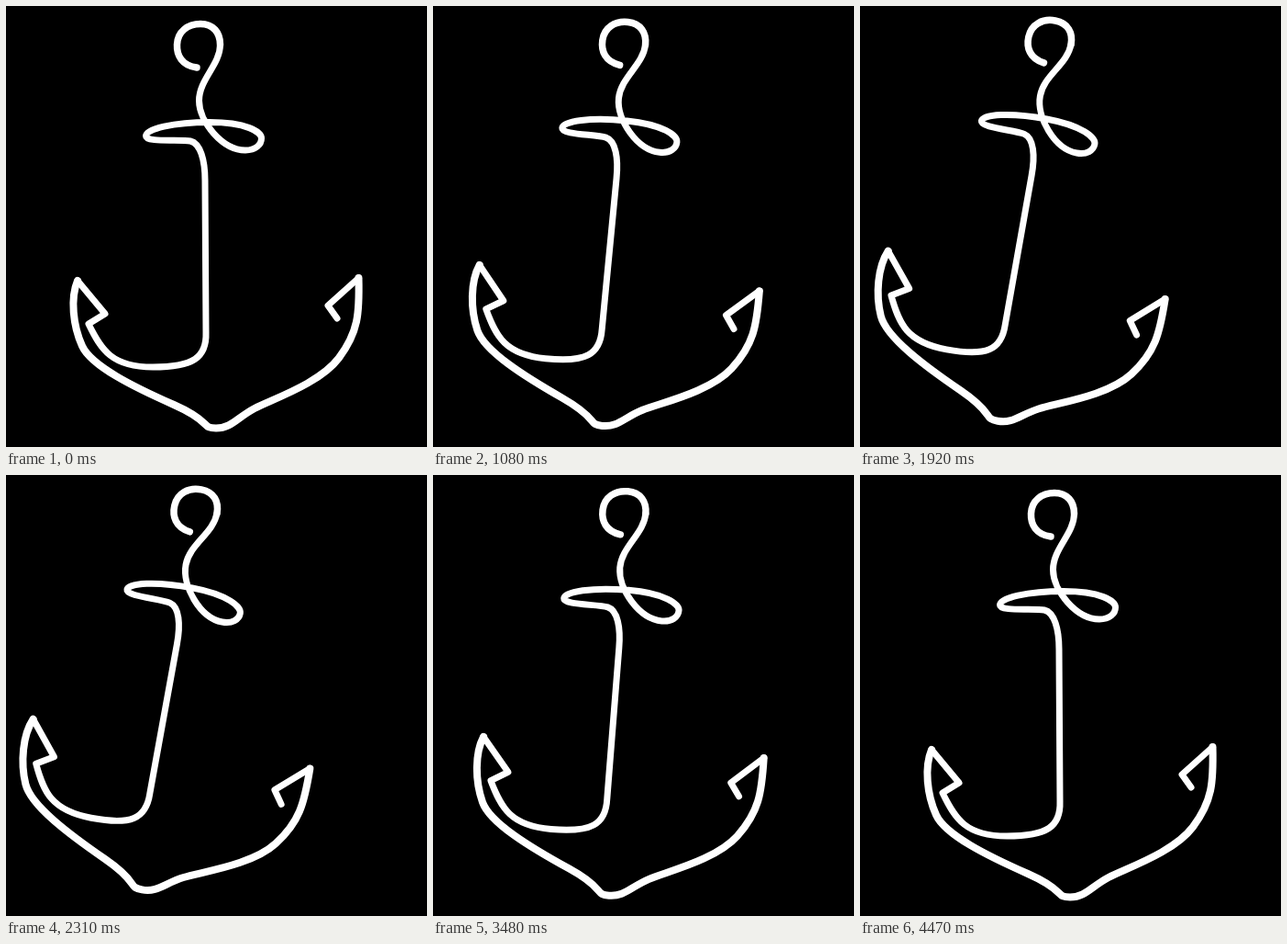
Recreate the animation shown at these times as an HTML page with a canvas. Size 459x480 px, loop 4500 ms.

```html
<!DOCTYPE html>
<html lang="en">
<head>
<meta charset="utf-8">
<title>Swinging anchor</title>
<style>
  html, body { margin: 0; width: 100%; height: 100%; overflow: hidden; background: #000; }
  canvas { display: block; }
</style>
</head>
<body>
<canvas id="stage" width="459" height="480"></canvas>
<script>
const ctx = document.getElementById('stage').getContext('2d');

const LOOP = 4500, STEP = 30;
const PEAK = 2130, REST = 4470;
const MAX_ANGLE = 11.55 * Math.PI / 180;
const PIVOT = { x: 232, y: 23 };

const ring = new Path2D(`M208 67 C192 65 186 54 186.5 42
  C187 28 198 19.5 212 19.5 S233.5 29 233.5 42`);

const crossbarAndShaft = new Path2D(`M233.5 42 C233.5 64 210.5 80 210.5 103
  S236 157 261 157 C272 157 278.5 151 278.5 144
  S262 126.5 222 126.5 S152.5 134 152.5 141.5
  S190 144.5 201 147 S217 168 217 190
  L218 355 C219 383 204 393 160 393 S104 375 90 346
  L108 335 L78 299`);

const arms = new Path2D(`M78 299 C70 318 73 348 83 370
  S140 415 183 434 S212 459.5 229 459.5 S252 448 271 438
  S342 411 363 383 S385.5 335 384.5 296`);

const rightBarb = new Path2D('M384.5 296 L351 326 L361 340');

// Rises linearly to the peak, then returns a little more slowly.
function swing(time) {
  const t = Math.floor(time % LOOP / STEP) * STEP;
  return MAX_ANGLE * Math.min(t / PEAK, (REST - t) / (REST - PEAK));
}

function stroke(path, width) {
  ctx.lineWidth = width;
  ctx.stroke(path);
}

function draw(time) {
  ctx.fillStyle = '#000';
  ctx.fillRect(0, 0, 459, 480);
  ctx.save();
  ctx.translate(PIVOT.x, PIVOT.y);
  ctx.rotate(swing(time));
  ctx.translate(-PIVOT.x, -PIVOT.y);
  ctx.strokeStyle = '#fff';
  ctx.lineCap = ctx.lineJoin = 'round';
  stroke(ring, 7.5);
  stroke(crossbarAndShaft, 7);
  stroke(arms, 8);
  stroke(rightBarb, 7);
  ctx.restore();
}

const start = performance.now();
function frame() {
  draw(performance.now() - start);
  requestAnimationFrame(frame);
}
frame();
</script>
</body>
</html>
```
